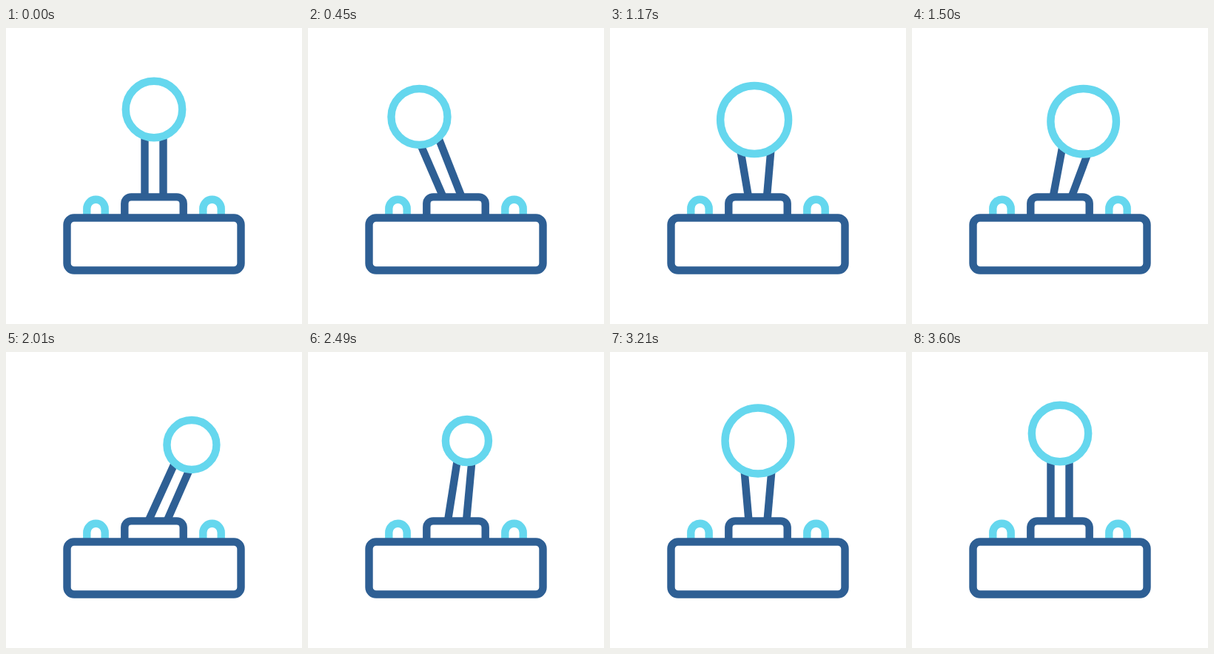
An HTML page without scripts that plays this animation: 400x400 px, repeating every 3.63 s.

```html
<!DOCTYPE html>
<html lang="en">
<head>
<meta charset="utf-8">
<title>Joystick</title>
<style>
@property --x { syntax: "<number>"; inherits: true; initial-value: 200; }
@property --y { syntax: "<number>"; inherits: true; initial-value: 110; }
@property --r { syntax: "<number>"; inherits: true; initial-value: 38.2; }
@property --w { syntax: "<number>"; inherits: true; initial-value: 12.5; }

html, body { margin: 0; width: 100%; height: 100%; overflow: hidden; background: #fff; }
svg { display: block; width: 100%; height: 100%; }

.outline { fill: none; stroke-width: 10.4; }
.navy { stroke: #2e5f94; }
.cyan { stroke: #65d7ee; }

/* --x, --y: ball centre; --r: ball radius; --w: half the spread of the rods at the ball */
.stick { animation: swing 3630ms linear infinite; }
.ball { cx: calc(var(--x) * 1px); cy: calc(var(--y) * 1px); r: calc(var(--r) * 1px); fill: #fff; }
.rod {
  --lean: calc((var(--x) - 200) * .1);
  transform:
    translate(calc((200 + var(--lean) + var(--side) * 12.5) * 1px), 228px)
    rotate(atan2(var(--lean) * 9 + var(--side) * (var(--w) - 12.5), 228 - var(--y)));
}
.left { --side: -1; }
.right { --side: 1; }

@keyframes swing {
  0% { --x: 200; --y: 110; --r: 38.2; --w: 12.5; animation-timing-function: cubic-bezier(.4, 0, .7, .8); }
  12.4% { --x: 150.5; --y: 120; --r: 38; --w: 14.6; }
  16.5% { --x: 145; --y: 124; --r: 39.3; --w: 16; }
  21.5% { --x: 153; --y: 127; --r: 42; --w: 20; }
  27.3% { --x: 173; --y: 126.5; --r: 45; --w: 24; }
  32.23% { --x: 195; --y: 124; --r: 46; --w: 25.8; }
  38% { --x: 220; --y: 125; --r: 45.6; --w: 24; }
  44.6% { --x: 243; --y: 127.5; --r: 43; --w: 20; }
  49.6% { --x: 252; --y: 128; --r: 38.5; --w: 15.5; }
  55.37% { --x: 251; --y: 125.5; --r: 33.5; --w: 11.7; }
  62% { --x: 237; --y: 122; --r: 30; --w: 10; }
  68.6% { --x: 215; --y: 120; --r: 29; --w: 9; }
  71.9% { --x: 206; --y: 115; --r: 33; --w: 10.5; }
  74.4% { --x: 200; --y: 110; --r: 38.2; --w: 12.5; }
  81% { --x: 200; --y: 116; --r: 42.3; --w: 18; }
  85.1% { --x: 200; --y: 120.8; --r: 45; --w: 22.5; }
  88.43% { --x: 200; --y: 120; --r: 44.5; --w: 22; }
  93.4% { --x: 200; --y: 114; --r: 41; --w: 16.5; }
  98.6%, 100% { --x: 200; --y: 110; --r: 38.2; --w: 12.5; }
}
</style>
</head>
<body>
<svg viewBox="0 0 400 400">
  <g class="stick outline">
    <path class="rod left navy" d="M0 0V-88"/>
    <path class="rod right navy" d="M0 0V-88"/>
    <circle class="ball cyan"/>
  </g>
  <g class="outline cyan">
    <path id="button" d="M109.3 253V244a12.2 12.2 0 0 1 24.4 0V253"/>
    <use href="#button" x="157"/>
  </g>
  <g class="outline navy">
    <path d="M160.3 256V237.4a9 9 0 0 1 9-9H230.7a9 9 0 0 1 9 9V256"/>
    <rect x="82.5" y="256.5" width="235" height="71" rx="9.5"/>
  </g>
</svg>
</body>
</html>
```
